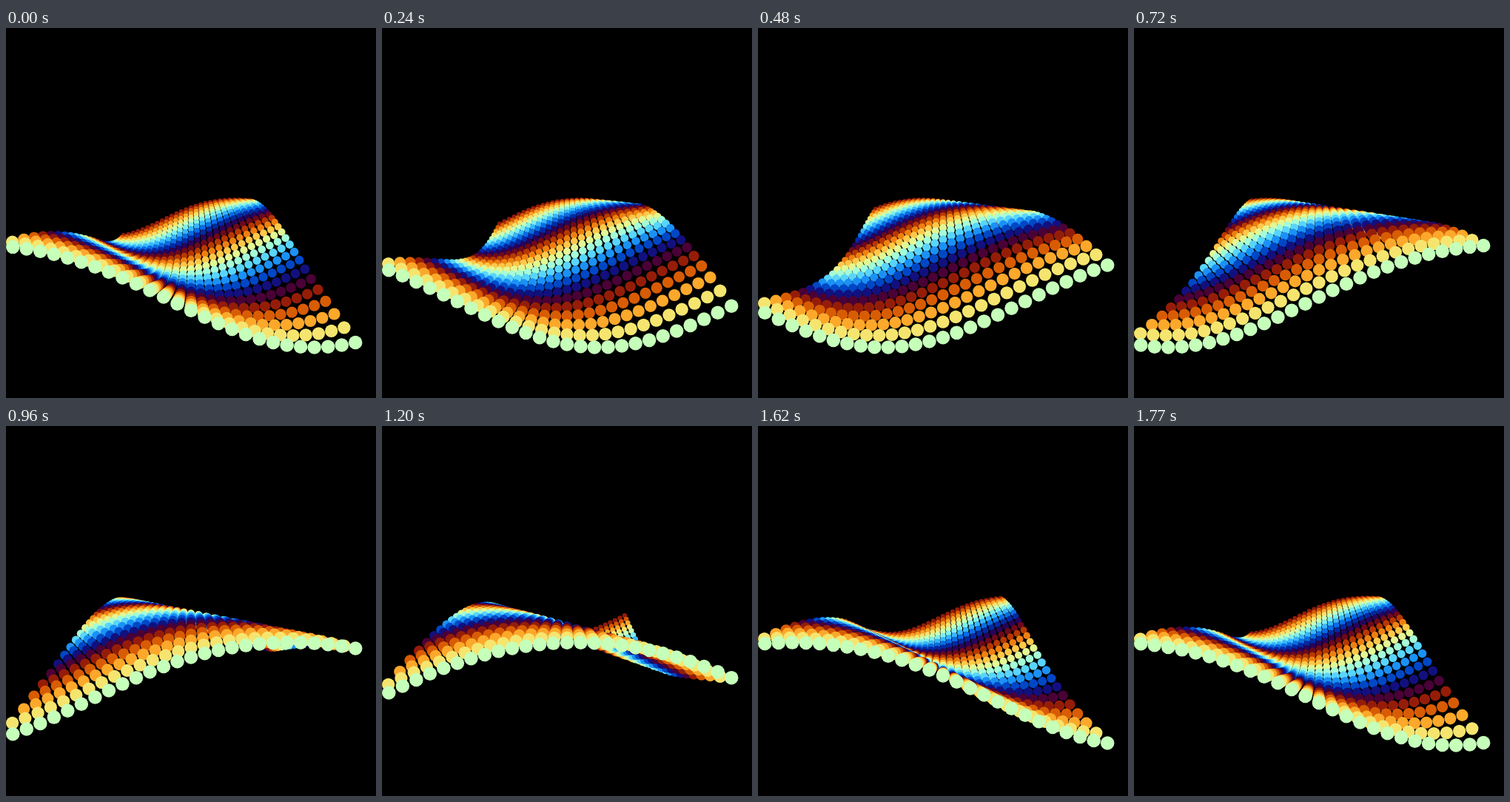
These frames come from a looping animation (500x500 px, 1800 ms). An HTML page with a canvas:

```html
<!DOCTYPE html>
<html lang="en">
<head>
<meta charset="utf-8">
<title>Dot wave</title>
<style>
  html, body { margin: 0; width: 100%; height: 100%; overflow: hidden; background: #000; }
  canvas { display: block; width: 500px; height: 500px; }
</style>
</head>
<body>
<canvas id="stage" width="500" height="500"></canvas>
<script>
const ctx = document.getElementById('stage').getContext('2d');
const LOOP = 1800, STEP = 30;
const FOCAL = 250, NEAR = 13.5, HORIZON = 200;
const ROWS = 26, FIRST_COL = -14, LAST_COL = 12;
const WAVELENGTH = 50, CREST = 9;

// Each row has one colour: three cosines a sixth of a turn apart.
function rowColor(row) {
  const a = 0.6 * row + 0.05;
  const level = shift => Math.round(127.5 + 127.5 * Math.cos(a + shift));
  return `rgb(${level(-Math.PI / 3)},${level(0)},${level(Math.PI / 3)})`;
}

// Depth below the horizon; the second harmonic sharpens the low side.
function depth(pos) {
  const a = (pos - CREST) * 2 * Math.PI / WAVELENGTH;
  return 8.426 + 3.75 * Math.cos(a) + 0.324 * Math.cos(2 * a);
}

function draw(time) {
  const shift = WAVELENGTH * time / LOOP;
  ctx.fillStyle = '#000';
  ctx.fillRect(0, 0, 500, 500);
  for (let row = ROWS - 1; row >= 0; row--) {
    const scale = FOCAL / (NEAR + row);
    ctx.fillStyle = rowColor(row);
    for (let col = FIRST_COL; col <= LAST_COL; col++) {
      const y = HORIZON + scale * depth(col + row + shift);
      ctx.beginPath();
      ctx.arc(250 + col * scale, y, scale / 2, 0, 2 * Math.PI);
      ctx.fill();
    }
  }
}

const start = performance.now();
function tick() {
  const time = (performance.now() - start) % LOOP;
  draw(Math.floor(time / STEP) * STEP);
  requestAnimationFrame(tick);
}
tick();
</script>
</body>
</html>
```
